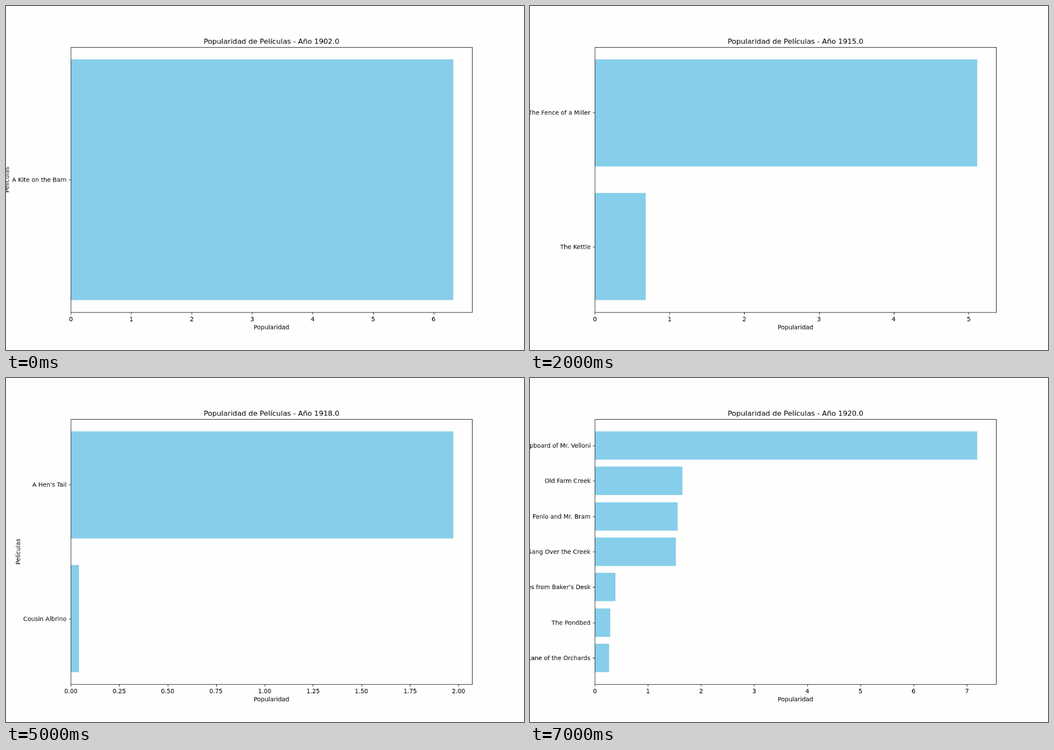
Write an HTML page with a canvas that moves like this. It is 917 px wide and 611 px high and loops after 8000 ms.

```html
<!DOCTYPE html>
<html lang="es">
<head>
<meta charset="utf-8">
<title>Popularidad de Películas</title>
<style>
  html, body { margin: 0; width: 100%; height: 100%; overflow: hidden; background: #fefefe; }
  canvas { display: block; }
</style>
</head>
<body>
<canvas id="stage" width="917" height="611"></canvas>
<script>
const stage = document.getElementById('stage');
const view = stage.getContext('2d');
view.imageSmoothingQuality = 'high';

// Charts are laid out on a 1200 x 800 sheet and scaled down to the stage.
const sheet = document.createElement('canvas');
sheet.width = 1200;
sheet.height = 800;
const ctx = sheet.getContext('2d');

const STEP_MS = 1000;
const FONT = '"DejaVu Sans", sans-serif';
const POINT = 100 / 72;
const plot = { left: 150, top: 96, width: 930, height: 616 };
const bottom = plot.top + plot.height;
const TICK = 5;

// side: baseline x of the vertical axis title, when it is on stage
const charts = [
  { year: 1902, tick: 1, side: 7, films: [['A Kite on the Barn', 6.322]] },
  { year: 1903, tick: 1, films: [['The Small Wagon Parade', 5.4]] },
  { year: 1915, tick: 1, films: [['The Fence of a Miller', 5.113], ['The Kettle', 0.683]] },
  { year: 1916, tick: 0.5, films: [['Patience: Two Farmers Underneath the Oaks', 4.285]] },
  { year: 1917, tick: 0.5, side: 25, films: [['The Bagmaker', 3.936], ['The Hatmender', 2.369]] },
  { year: 1918, tick: 0.25, side: 33, films: [["A Hen's Tail", 1.972], ['Cousin Albrino', 0.043]] },
  { year: 1919, tick: 0.5, films: [["Faded Clover or the Carter's Girl", 3.2], ['Plain and Fancy Hats', 1.3]] },
  { year: 1920, tick: 1, films: [
    ['The Curious Cupboard of Mr. Velloni', 7.193],
    ['Old Farm Creek', 1.651],
    ['Dr. Fenlo and Mr. Bram', 1.561],
    ['The Scarecrow: How He Sang Over the Creek', 1.53],
    ["Verses from Baker's Desk", 0.387],
    ['The Pondbed', 0.293],
    ['The Lane of the Orchards', 0.27]
  ] }
];

const snap = v => Math.round(v) + 0.5;

function line(x1, y1, x2, y2) {
  ctx.beginPath();
  ctx.moveTo(snap(x1), snap(y1));
  ctx.lineTo(snap(x2), snap(y2));
  ctx.stroke();
}

// anchor: 0.5 centres the text on x, 1 ends it there
function text(str, x, y, anchor = 0.5, points = 10) {
  ctx.font = `${points * POINT}px ${FONT}`;
  const start = x - anchor * ctx.measureText(str).width;
  ctx.fillText(str, Math.round(start), Math.round(y));
}

function drawBars(films, toX) {
  const pad = plot.height / 22;
  const pitch = (plot.height - 2 * pad) / (films.length - 0.2);
  films.forEach(([name, value], i) => {
    const y = plot.top + pad + i * pitch;
    const middle = y + 0.4 * pitch;
    const top = Math.round(y);
    ctx.fillStyle = '#87ceeb';
    ctx.fillRect(plot.left, top, Math.round(toX(value)) - plot.left, Math.round(y + 0.8 * pitch) - top);
    ctx.fillStyle = '#000';
    line(plot.left - TICK, middle, plot.left, middle);
    text(name, plot.left - 9.7, middle + 5, 1);
  });
}

function drawTicks(step, max, toX) {
  const digits = step === 1 ? 0 : step === 0.5 ? 1 : 2;
  for (let v = 0; v <= max; v += step) {
    const x = toX(v);
    line(x, bottom, x, bottom + TICK);
    text(v.toFixed(digits), x, 733);
  }
}

function draw({ year, tick, side, films }) {
  const max = films[0][1] * 1.05;
  const toX = v => plot.left + v / max * plot.width;
  ctx.fillStyle = '#fefefe';
  ctx.fillRect(0, 0, sheet.width, sheet.height);
  ctx.strokeStyle = '#000';
  ctx.lineWidth = 0.8 * POINT;

  drawBars(films, toX);
  drawTicks(tick, max, toX);
  ctx.strokeRect(snap(plot.left), snap(plot.top), plot.width, plot.height);

  const centerX = plot.left + plot.width / 2;
  text(`Popularidad de Películas - Año ${year}.0`, centerX, 88, 0.5, 12);
  text('Popularidad', centerX, 752);
  if (side !== undefined) {
    ctx.save();
    ctx.translate(side, plot.top + plot.height / 2);
    ctx.rotate(-Math.PI / 2);
    text('Películas', 0, 0);
    ctx.restore();
  }
  view.drawImage(sheet, 0, 0, stage.width, stage.height);
}

const start = performance.now();
function frame() {
  const elapsed = performance.now() - start;
  draw(charts[Math.floor(elapsed / STEP_MS) % charts.length]);
  requestAnimationFrame(frame);
}
frame();
</script>
</body>
</html>
```
